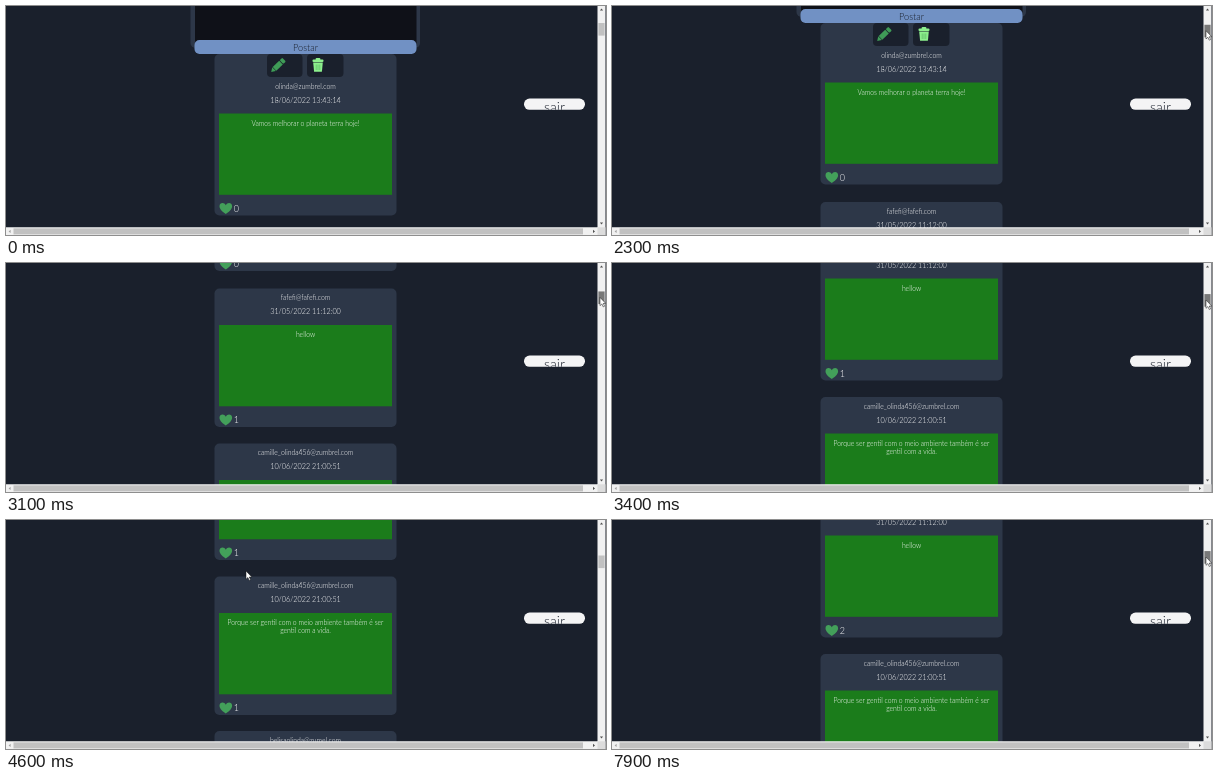
Recreate the animation shown at these times as an HTML page. Size 600x229 px, loop 8 s.

```html
<!DOCTYPE html>
<html lang="pt">
<head>
<meta charset="utf-8">
<title>Feed</title>
<style>
html, body { margin: 0; height: 100%; overflow: hidden; background: #1a202c; }
svg { display: block; width: 100vw; height: 100vh; }
text { font: 300 6.8px Lato, sans-serif; fill: #fff; text-anchor: middle; }
.date { font-size: 7.25px; }
.count { font-size: 9px; text-anchor: start; }
.post { font-size: 9.2px; fill: #1a202c; }
.exit { font-size: 14px; fill: #1a202c; }
.panel { fill: #2d3748; }
.dark { fill: #1a202c; }
</style>
</head>
<body>
<svg viewBox="0 0 600 229">
  <defs>
    <path id="heart" d="M0 5.6C-2.5 3.8-6.3 1-6.3-2.2C-6.3-6-1.6-6.6 0-3.3C1.6-6.6 6.3-6 6.3-2.2C6.3 1 2.5 3.8 0 5.6Z" fill="#43a05a"/>
    <clipPath id="pill"><rect x="518" y="92.5" width="61" height="11.3" rx="5.6"/></clipPath>
  </defs>
  <rect class="dark" width="600" height="229"/>
  <g id="page">
    <rect class="panel" x="184.5" y="-30" width="229.5" height="72" rx="5"/>
    <rect x="189" y="-30" width="221.5" height="70" fill="#0f1118"/>
    <rect x="188.5" y="34" width="222" height="14" rx="5" fill="#7191c4"/>
    <text class="post" x="299.5" y="44.6">Postar</text>
    <g id="cards"></g>
    <rect class="dark" x="261" y="48" width="35.5" height="23" rx="4"/>
    <rect class="dark" x="301" y="48" width="36.5" height="23" rx="4"/>
    <g transform="translate(265.2 66) rotate(-44)" fill="#3f9c57">
      <path d="M0 0L4-2.6V2.6Z"/>
      <rect x="4.6" y="-2.6" width="9" height="5.2"/>
      <rect x="14.3" y="-2.6" width="3.6" height="5.2" rx="1"/>
    </g>
    <g fill="#8df08d">
      <rect x="306.5" y="53.6" width="11" height="2.4" rx="1"/>
      <rect x="309.6" y="52" width="4.8" height="2.4" rx="1"/>
      <path d="M307.2 56.6H316.8L315.9 65.8H308.1Z"/>
      <path d="M310.2 58.5V64M312 58.5V64M313.8 58.5V64" stroke="#4fae5c" stroke-width=".6"/>
    </g>
  </g>
  <g clip-path="url(#pill)">
    <rect x="518" y="92" width="61" height="12" fill="#f4f4f5"/>
    <text class="exit" x="548.5" y="105.8">sair</text>
  </g>
  <path d="M591.5 0H599.5V229H0V221.3H591.5Z" fill="#f1f1f1"/>
  <rect x="591.5" y="221.3" width="8" height="7.7" fill="#dcdcdc"/>
  <rect x="7.5" y="222.4" width="569.5" height="6" fill="#c1c1c1"/>
  <path d="M4.6 223.8V227L2.6 225.4Z" fill="#a3a3a3"/>
  <path d="M587 223.8V227L589 225.4ZM593.9 4.6H597.1L595.5 2.6ZM593.9 216.6H597.1L595.5 218.6Z" fill="#505050"/>
  <rect id="thumb" x="592.4" width="6.2" height="12.6"/>
  <path id="mouse" d="M0 0V8.2L1.9 6.5L3.2 9.4L4.6 8.8L3.3 6H5.8Z" fill="#fff" stroke="#111" stroke-width=".5"/>
</svg>
<script>
const $ = id => document.getElementById(id);

// y is the top of the green message box
const posts = [
  { y: 107.5, mail: 'olinda@zumbrel.com', date: '18/06/2022 13:43:14', lines: ['Vamos melhorar o planeta terra hoje!'] },
  { y: 263.5, mail: 'fafefi@fafefi.com', date: '31/05/2022 11:12:00', lines: ['hellow'] },
  { y: 418.5, mail: 'camille_olinda456@zumbrel.com', date: '10/06/2022 21:00:51',
    lines: ['Porque ser gentil com o meio ambiente também é ser', 'gentil com a vida.'] },
  { y: 573, mail: 'belisaolinda@zumel.com', date: '', lines: [] }
];

$('cards').innerHTML = posts.map(({ y, mail, date, lines }, i) => {
  const top = i ? y - 36.5 : 48;
  return `<rect class="panel" x="208.5" y="${top}" width="182" height="${y + 102 - top}" rx="5"/>
    <text x="299.5" y="${y - 25}">${mail}</text>
    <text class="date" x="299.5" y="${y - 10.9}">${date}</text>
    <rect x="213" y="${y}" width="173" height="81.3" fill="#1b7c1b"/>
    ${lines.map((s, n) => `<text x="299.5" y="${y + 12 + 8 * n}">${s}</text>`).join('')}
    <use href="#heart" x="219.8" y="${y + 95}"/>
    <text class="count" id="count${i}" x="227.8" y="${y + 98}">0</text>`;
}).join('');

// Linear interpolation over [time, ...values] keys
function at(keys, t) {
  const i = keys.findIndex(k => k[0] > t);
  if (i === 0) return keys[0].slice(1);
  if (i < 0) return keys[keys.length - 1].slice(1);
  const a = keys[i - 1], b = keys[i], p = (t - a[0]) / (b[0] - a[0]);
  return a.slice(1).map((v, n) => v + (b[n + 1] - v) * p);
}

const scrollKeys = [[2100, 0], [2300, 31], [2700, 124], [3400, 248], [4000, 325.5], [7700, 325.5], [7900, 248]];
const mouseKeys = [
  [600, 278, -14], [1000, 400, 30], [1300, 545, 33], [1500, 594, 24], [2100, 594, 23],
  [4100, 594, 41.5], [4300, 480, 43], [4600, 240, 51], [4900, 219, 33], [5200, 219, 33],
  [5500, 232, 95], [5900, 219, 187], [6200, 219, 187], [6600, 343, 168], [6800, 375, 155],
  [7200, 520, 85], [7600, 594, 41.5]
];
const STEP = 15.5;

function draw(now) {
  const t = Math.floor(now % 8000 / 100) * 100;
  const scroll = Math.round(at(scrollKeys, t)[0] / STEP) * STEP;
  const thumbY = 17 + scroll / 17.6;
  const drag = t >= 1800 && t < 4100 || t >= 7600;
  const hover = t >= 1500 && t < 4200;
  let [x, y] = at(mouseKeys, t);
  if (drag) [x, y] = [594, thumbY + 6];

  $('page').setAttribute('transform', `translate(0 ${-scroll})`);
  $('thumb').setAttribute('y', thumbY);
  $('thumb').setAttribute('fill', drag ? '#787878' : hover ? '#a8a8a8' : '#c1c1c1');
  $('mouse').setAttribute('transform', `translate(${x} ${y})`);
  $('count1').textContent = t < 5100 ? 1 : 2;
  $('count2').textContent = t < 6100 ? 1 : 2;
}

const start = performance.now();
(function loop() {
  draw(performance.now() - start);
  requestAnimationFrame(loop);
})();
</script>
</body>
</html>
```
